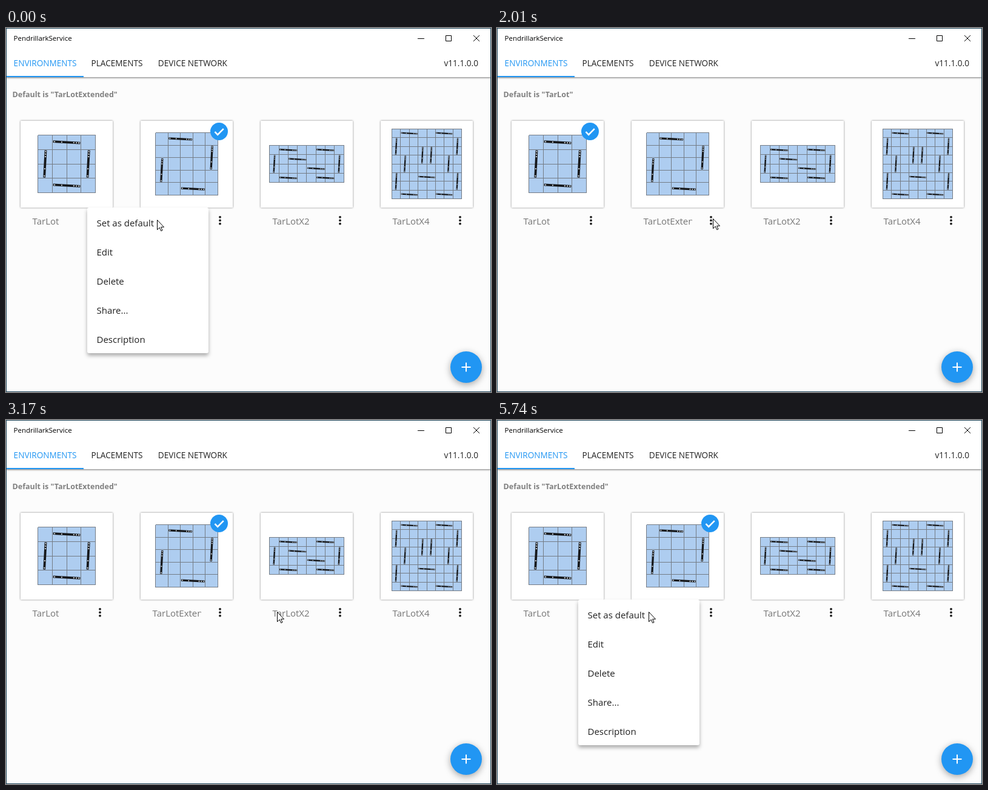
Recreate the animation shown at these times as an HTML page. Size 800 by 600 pixels, loop 5870 ms.

```html
<!DOCTYPE html>
<html lang="en">
<head>
<meta charset="utf-8">
<style>
  html, body { margin: 0; width: 100%; height: 100%; overflow: hidden; background: #fcfcfc; }
  svg { display: block; width: 800px; height: 600px; font: 15px "Open Sans", "Noto Sans", sans-serif; }
  .tab { font-size: 13.6px; fill: #222; }
  .label { fill: #757575; }
  .header { fill: #fff; filter: drop-shadow(0 1.5px 1.5px rgba(0,0,0,.55)); }
  .card { fill: #fff; filter: drop-shadow(0 0 1.5px rgba(0,0,0,.5)); }
  .sheet { fill: #fff; filter: drop-shadow(0 4px 3px rgba(0,0,0,.32)); }
  .fab { fill: #2196f3; filter: drop-shadow(0 3px 6px rgba(0,0,0,.35)); }
  .line { fill: none; stroke: #000; }
  .grid { fill: none; stroke: #747c86; shape-rendering: crispEdges; }
</style>
</head>
<body>
<svg id="stage" viewBox="0 0 800 600"></svg>
<script>
const BLUE = '#2196f3';
const LOOP = 5870;
const STEP = 70;    // the picture advances in steps of this many ms
const PITCH = 198;  // distance between cards

// Bar layouts repeat a few seed bars by symmetry, in cell units.
const quarterTurns = (size, seeds) => seeds.flatMap(([x, y]) =>
  [[x, y], [size - y, x], [size - x, size - y], [y, size - x]]);
const halfTurns = (cols, rows, seeds) => seeds.flatMap(([x, y]) => [[x, y], [cols - x, rows - y]]);
const mirrored = (cols, seeds) => seeds.flatMap(([x, y]) => [[x, y], [cols - x, y]]);

const environments = [
  { name: 'TarLot', cell: 23.75, cols: 4, rows: 4, bars: quarterTurns(4, [[2, .5]]) },
  { name: 'TarLotExtended', cell: 20.6, cols: 5, rows: 5, bars: quarterTurns(5, [[2, .5]]) },
  { name: 'TarLotX2', cell: 15.3, cols: 8, rows: 4,
    bars: halfTurns(8, 4, [[2, .5], [6, .5], [3, 1.5], [.5, 2]]) },
  { name: 'TarLotX4', cell: 14.4, cols: 8, rows: 8,
    bars: [...quarterTurns(8, [[2, .5], [6, .5]]), ...mirrored(8, [[1.5, 4], [3.5, 3]]), [4, 5.5]] },
];

const text = (x, y, content, attrs = '') => `<text x="${x}" y="${y}" ${attrs}>${content}</text>`;
const rect = (x, y, w, h, attrs = '') => `<rect x="${x}" y="${y}" width="${w}" height="${h}" ${attrs}/>`;
const circle = (x, y, r, attrs = '') => `<circle cx="${x}" cy="${y}" r="${r}" ${attrs}/>`;

// A whole x means the bar lies flat, otherwise it stands.
function bar([x, y], cell) {
  const angle = Number.isInteger(x) ? 3 : -87;
  const lights = [-.84, -.34, .5, .68, .85].map(p => circle(p, 0, .045)).join('');
  return `<g transform="scale(${cell}) translate(${x} ${y}) rotate(${angle})">
    ${rect(-.94, -.08, 1.88, .16, 'fill="#16181b"')}<g fill="#e0e6ec">${lights}</g></g>`;
}

function plan({ cell, cols, rows, bars }, centerX) {
  const w = cols * cell, h = rows * cell;
  let grid = '';
  for (let i = 0; i <= cols; i++) grid += `M${i * cell} 0v${h}`;
  for (let i = 0; i <= rows; i++) grid += `M0 ${i * cell}h${w}`;
  return `<g transform="translate(${centerX - w / 2} ${224 - h / 2})">
    ${rect(0, 0, w, h, 'fill="#aecdf0"')}<path class="grid" d="${grid}"/>
    ${bars.map(b => bar(b, cell)).join('')}</g>`;
}

function card(env, i) {
  const x = 24 + PITCH * i;
  const dots = [-1, 0, 1].map(k => circle(x + 131, 317.2 + 5.5 * k, 1.9)).join('');
  return rect(x, 153, 152, 143, 'class="card" rx="1"') + plan(env, x + 76) +
    `<clipPath id="clip${i}">${rect(x + 18, 300, 82, 40)}</clipPath>` +
    text(x + 19.6, 324.3, env.name, `class="label" clip-path="url(#clip${i})"`) +
    `<g fill="#222">${dots}</g>`;
}

const menuItems = ['Set as default', 'Edit', 'Delete', 'Share...', 'Description']
  .map((item, i) => text(15.5, 31 + 48 * i, item, 'fill="#212121"')).join('');

document.getElementById('stage').innerHTML = `
  ${rect(0, 0, 800, 600, 'fill="#fcfcfc"')}
  ${rect(0, 0, 800, 81, 'class="header"')}
  ${text(12.5, 21, 'PendrillarkService', 'font-size="11.5"')}
  <path class="line" d="M679 17.5h11M725.5 12.5h9v9h-9zM771 12l10 10M781 12l-10 10"/>
  ${text(12.6, 63, 'ENVIRONMENTS', `class="tab" style="fill:${BLUE}"`)}
  ${text(140.6, 63, 'PLACEMENTS', 'class="tab"')}
  ${text(250.8, 63, 'DEVICE NETWORK', 'class="tab"')}
  ${text(779, 63, 'v11.1.0.0', 'class="tab" text-anchor="end"')}
  ${rect(1, 79, 127, 2, `fill="${BLUE}"`)}
  ${text(10.5, 114, '', 'id="status" font-size="12.5" font-weight="700" fill="#808080"')}
  ${environments.map(card).join('')}
  <g id="badge">${circle(0, 0, 14.5, `fill="${BLUE}"`)}
    <path d="M-7 .7l4.6 4.6L7.3 -4.4" fill="none" stroke="#fff" stroke-width="2.6"/></g>
  ${circle(759, 559, 26, 'class="fab"')}
  <path d="M751.5 559h15M759 551.5v15" stroke="#fff" stroke-width="2"/>
  <g id="menu">${rect(0, 0, 200, 240, 'class="sheet" rx="3"')}${menuItems}</g>
  <path id="cursor" d="M.5 .5V16.5L4.2 13L6.7 18.5L9 17.5L6.6 12.2H11.5Z" fill="#fff" stroke="#000"/>
  ${rect(.5, .5, 799, 599, 'fill="none" stroke="#20475c"')}`;

const [status, badge, menu, cursor] =
  ['status', 'badge', 'menu', 'cursor'].map(id => document.getElementById(id));

const clamp = v => Math.min(1, Math.max(0, v));
const smooth = p => p * p * (3 - 2 * p);
const easeOut = (elapsed, duration, power) => 1 - (1 - clamp(elapsed / duration)) ** power;
const stepsSince = (t, start) => Math.floor((t - start) / STEP) * STEP;

// The pointer alternates between a menu item and the button of the next card.
const glides = [
  { start: 1450, end: 2010, x: 356, y: 314 },
  { start: 2290, end: 2640, x: 447, y: 316 },
  { start: 4420, end: 4910, x: 155, y: 314 },
  { start: 5250, end: 5740, x: 250, y: 316 },
];

function pointer(t) {
  let x = 249, y = 316;
  for (const glide of glides) {
    const p = smooth(clamp(stepsSince(t, glide.start) / (glide.end - glide.start)));
    x += (glide.x - x) * p;
    y += (glide.y - y) * p - 28 * p * (1 - p);
  }
  return [Math.round(x), Math.round(y)];
}

// Choosing the first item of a menu makes its card the default.
const menuShows = [
  { card: 0, open: -LOOP, close: 130 },
  { card: 1, open: 2150, close: 3030 },
  { card: 0, open: 5110, close: LOOP },
];

function drawMenu(t) {
  const { card, open, close } = menuShows.findLast(show => show.open <= t);
  const closing = t >= close;
  const elapsed = closing ? stepsSince(t, close) + 5 : stepsSince(t, open) - 23;
  const fade = easeOut(elapsed, 150, 3);
  const grow = easeOut(elapsed, 220, 5) / 10;
  menu.setAttribute('opacity', closing ? 1 - fade : fade);
  menu.setAttribute('transform',
    `translate(${134 + PITCH * card} 296) scale(${closing ? 1 - grow : .9 + grow})`);
}

function draw(now) {
  const t = now % LOOP;
  const selected = menuShows.findLast(show => show.close + 2 * STEP <= t)?.card ?? 1;
  status.textContent = `Default is "${environments[selected].name}"`;
  badge.setAttribute('transform', `translate(${153.5 + PITCH * selected} 170.5)`);
  drawMenu(t);
  cursor.setAttribute('transform', `translate(${pointer(t)})`);
}

let begin;
function tick(now) {
  begin ??= now;
  draw(now - begin);
  requestAnimationFrame(tick);
}
draw(0);
requestAnimationFrame(tick);
</script>
</body>
</html>
```
